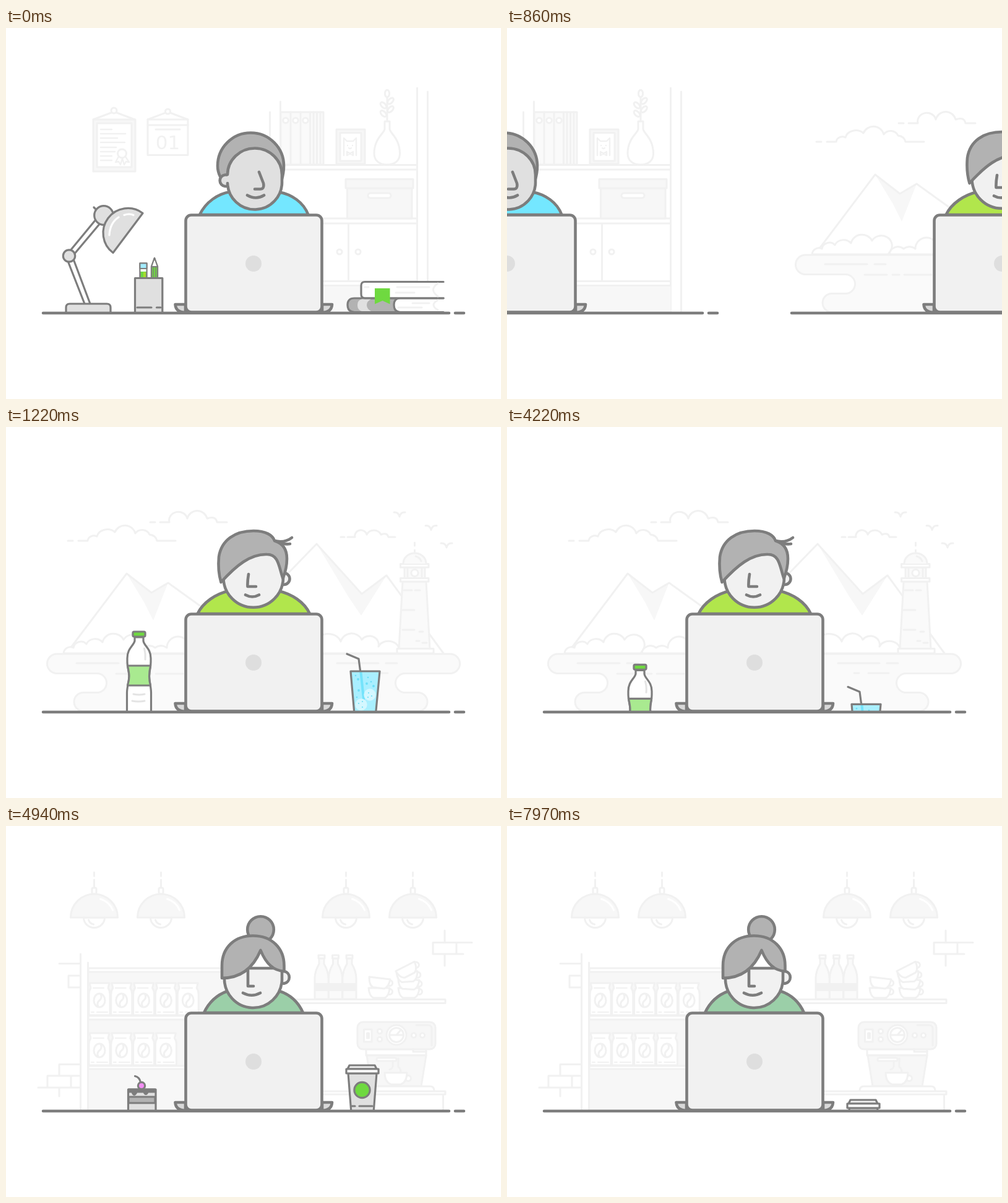
Write an HTML page that moves like this. It is 800 px wide and 600 px high and loops after 8 s.

```html
<!DOCTYPE html>
<html lang="en">
<head>
<meta charset="utf-8">
<title>Three desks</title>
<style>
html, body { margin: 0; width: 100%; height: 100%; overflow: hidden; background: #fff; }
svg { display: block; width: 100vw; height: 100vh; }
g { stroke-linecap: round; stroke-linejoin: round; }
.back { stroke: #f1f1f1; stroke-width: 3; }
.bold { stroke: #7d7d7d; stroke-width: 4.6; }
.prop { stroke: #7d7d7d; stroke-width: 3.2; }
.day { font: 31px "DejaVu Sans", sans-serif; fill: #f1f1f1; stroke: none; text-anchor: middle; }
</style>
</head>
<body>
<svg id="stage" viewBox="0 0 800 600">
  <clipPath id="above"><rect width="800" height="460"/></clipPath>
</svg>
<script>
const GREY = '#e0e0e0', DARK = '#7d7d7d', HAIR = '#b2b2b2', SKIN = '#f1f1f1';
const TINT = '#f7f7f7', PALE = '#fafafa', GREEN = '#6fd940', WHITE = '#fff';

const path = (d, fill = 'none', more = '') => `<path d="${d}" fill="${fill}" ${more}/>`;
const box = (x, y, x2, y2, fill = 'none', r = 0, more = '') =>
  `<rect x="${x}" y="${y}" width="${x2 - x}" height="${y2 - y}" rx="${r}" fill="${fill}" ${more}/>`;
const disc = (x, y, r, fill = 'none', more = '') =>
  `<circle cx="${x}" cy="${y}" r="${r}" fill="${fill}" ${more}/>`;
const oval = (x, y, rx, ry, turn = 0) =>
  `<ellipse rx="${rx}" ry="${ry}" fill="#fff" transform="translate(${x} ${y}) rotate(${turn})"/>`;
const line = (color, width) => `stroke="${color}" stroke-width="${width}"`;
const bare = 'stroke="none"';
const each = (list, draw) => list.map(draw).join('');

const laptop =
  path('M290 447H273.5Q274.500 460 290 460ZM511 447H527Q526 460 511 460Z', '#d9d9d9') +
  box(290.5, 302.5, 510.5, 459.5, SKIN, 9) +
  disc(400, 381, 13, '#dedede', bare) +
  path('M60 461H716M726 461H740');

// Office
function office() {
  const wall =
    path('M141 148L170 137M179 137L208 148M229 148L258 137M265 137L294 148') +
    disc(174.5, 133.5, 4.5) + disc(261.5, 135, 4) +
    box(141, 148, 209, 232, TINT) + box(147, 154, 203, 225, WHITE) +
    path('M153 164H171M153 171H193M153 178H180M153 185H192M153 193H178M153 200H176M153 207H171M153 214H171', 'none', line('#f1f1f1', 2.4)) +
    path('M182 208L177 217L182 216L185 221L188 211L191 221L194 216L199 217L193 208', WHITE, line('#f1f1f1', 2.4)) +
    disc(187.500, 203, 7, WHITE) +
    box(229, 148, 294, 205.5, WHITE) + path('M242 164H281M229 157H294') +
    '<text class="day" x="261.5" y="196">01</text>';

  const shelf =
    path('M443.5 119V221M426.5 136V221M664.5 97V459M681.5 103V459') +
    box(500, 417, 664.5, 459, TINT, 0, bare) +
    path('M430 221.5H664M430 229H664M500 308H664M500 316H664M500 409.5H664M500 416.5H664M553.5 316V409') +
    disc(539, 362, 4) + disc(569, 362, 4) +
    box(551.5, 259, 656, 308, TINT) + box(549, 244.5, 658, 259, TINT) +
    box(585, 267, 622, 275, WHITE, 4) +
    box(444, 136, 513, 221, PALE) +
    path('M460 136V221M476 136V221M491.5 136V221M497 136V221M502.5 136V221M508 136V221') +
    each([452, 468, 484], x => disc(x, 149.5, 4.3, WHITE)) +
    box(534, 164, 580, 220, TINT) + box(540, 169.5, 574, 215, WHITE) +
    path('M546 206V178L551 183H561L566 178V206M551 200L561 206V200L551 206ZM552 190V190.1M560 190V190.1M554 194Q556 196 558 194', 'none', line('#f1f1f1', 2.4)) +
    path('M612 151V163C612 170 595 178 595 203C595 214 603 221 616 221S636.5 214 636.5 203C636.5 178 620 170 620 163V151Z', WHITE) +
    path('M616 150V112') + oval(616, 106, 3.6, 5.8) +
    oval(610, 125, 3.4, 6, -45) + oval(610, 138.5, 3.4, 6, -45) +
    oval(621.5, 118, 3.4, 6, 45) + oval(621.5, 131.5, 3.4, 6, 45);

  const person =
    path('M313 302C323 281 343 268 362 265H440C462 269 481 282 488.5 302Z', '#74e7ff') +
    path('M346 240Q342 232 342 223A53.500 53.500 0 0 1 449 223Q449 234 445.500 246Z', HAIR) +
    path('M359 237.5H354A9.3 9.3 0 0 0 354 256H358', GREY) +
    path('M358 237A44 43 0 0 1 446 238V248A44 44 0 0 1 358 251', GREY) +
    path('M409 233L416 251Q418 261 410 260.500H402M390 270.5Q404 278.500 417 270.5');

  const lamp =
    path('M100 377L127 446M109 374L136 446M103 361L145 310M110 366L152 316') +
    path('M97 462V452Q97 446 103 446H163Q169 446 169 452V462Z', GREY) +
    disc(102, 368.5, 9.7, GREY) +
    path('M142 290L147 295') + disc(158, 303, 15.3, GREY) +
    path('M173 363.5A40 40 0 0 1 221 299.5Z', GREY) +
    path('M167 335Q168 315 182 306M191 302.5Q199 299.500 206 302.5', 'none', line(WHITE, 3.2));

  const pencils =
    box(216.500, 380.500, 227.500, 405, GREEN, 0, line(DARK, 2.4)) +
    path('M222 395H226V404H222Z', '#a8dc2c', bare) +
    path('M216.500 380.500H227.500V389H216.500Z', '#a3ecff', line(DARK, 2)) +
    path('M217.500 390H226.500V394H217.500Z', WHITE, bare) +
    path('M235 405V386L240 372L245 386V405Z', GREEN, line(DARK, 2.4)) +
    path('M235 386L240 372L245 386Z', WHITE, line(DARK, 2)) +
    path('M238.200 387V404M241.800 387V404', 'none', line(DARK, 1.2)) +
    path('M239 375L240 372L241 375Z', DARK, line(DARK, 2)) +
    box(208.500, 404.5, 252.8, 462, GREY) +
    path('M212 452H235M243.500 452H250');

  const books =
    path('M634 437H563Q552 437 552 448T563 459.500H634Z', HAIR) +
    path('M575 438.500Q568 440 568 448T575 458H590Q583 454 583 448T590 438.500Z', GREY, bare) +
    path('M707 437H637Q627 437 627 448T637 459.500H707', WHITE) +
    path('M707 410.500H580Q574 410.500 574 416.500V430.500Q574 436.8 580 436.8H707', WHITE) +
    path('M698 413Q683 423 698 434M698 440Q684 448 698 456M632 419H684M580 419H586M630 428H660M657 445H684M634 452H672', 'none', line('#f1f1f1', 3)) +
    path('M596 421H620.500V446.500L608.5 441L596 446.500Z', GREEN, bare);

  return [wall + shelf, person, lamp + pencils + books];
}

// Seaside
function seaside() {
  const bird = ([x, y]) => path(`M${x - 9} ${y - 4}Q${x - 2} ${y - 5} ${x} ${y + 3}Q${x + 2} ${y - 5} ${x + 9} ${y - 4}`);
  const back =
    path('M100 184H108M117 184H132A10 9 0 0 1 147 177A17 14 0 0 1 176 170A17.500 17.500 0 0 1 209 172A13 12 0 0 1 232 174Q242 175 244 184H274') +
    path('M233 154H241M249 154H264A13 12 0 0 1 293 148A16.500 16.500 0 0 1 325 148Q339 143 341 154H357') +
    path('M541 178H547M552 178H564A9.500 9 0 0 1 583 174A13 13 0 0 1 606 174Q616 170 618 178H629') +
    each([[636, 142], [687, 163.500], [712, 192]], bird) +
    path('M195 237L235 268L262 252L238 313L223 283Z', TINT, bare) +
    path('M502 189L575 270L615 240L574 305L553 274Z', TINT, bare) +
    path('M100 363L195 237L235 268L262 252L330 301M440 253L502 189L575 270L615 240L707 366') +
    path('M82.5 367H717.5a16 15.7 0 0 1 0 31.500H645a15.5 15.5 0 0 0 0 31H666a15 15 0 0 1 0 30H125a15 15 0 0 1 0-30H147a15.5 15.5 0 0 0 0-31H82.5a16 15.7 0 0 1 0-31.500Z', PALE) +
    path('M93 366A11 11 0 0 1 109 357A12 11 0 0 1 130 351A15 13 0 0 1 156 348A18 17 0 0 1 190 344A16 15 0 0 1 220 360L216 366Z', WHITE) +
    path('M218 366A14 13 0 0 1 241 357A14 12 0 0 1 260 357A17 17 0 0 1 296 357V366Z', WHITE) +
    path('M500 366V360A16 14 0 0 1 541 347A18 17 0 0 1 575 344A15 14 0 0 1 602 355A17 14 0 0 1 634 366Z', WHITE) +
    path('M114 382H182M194 382H212M178 399H214M223 399H234M242 399H286M535 382H602M614 382H632M561 398H569M584 398H617');
  const tower =
    path('M641 250L635 359H685L679 250Z', PALE) +
    box(632, 358.5, 691, 366, WHITE) +
    box(644, 227, 677, 245, PALE) + path('M649 227V245M672 227V245') +
    disc(660.5, 236, 5.6, WHITE) +
    box(637.5, 244.5, 683, 250, WHITE) + box(637.5, 221.5, 683, 227, WHITE) +
    path('M642 221A18.5 17 0 0 1 679 221', PALE) +
    path('M660.500 204V199M660.500 192V187M662 209Q669 211 671 217M643 264H656M661 264H669M641 296H660M641 328H660M663 346H668M673 349H680M668 331H674');

  const person =
    path('M309.500 302C319 283 339 270 360 265H440C462 270 482 283 491 302Z', '#b1e64c') +
    path('M446 236H449A9.4 9.4 0 0 1 449 255H445', SKIN) +
    disc(399.7, 243.500, 48.3, SKIN) +
    path('M434 184Q450 188 462 179M447 188Q452 190 459 189') +
    path('M347.5 251C343 236 343 221 344 210C348 183 370 168 400 168C420 168 431 175 434 184C447 188 454 198 454 213C454 225 451 236 447.5 245C441 227 441 206 422 206C395 205 372 224 347.5 251Z', HAIR) +
    path('M392 238Q390 250 390.500 258H404M387 271.5Q398 277.5 409 271.5');

  const bottle =
    path('M208 340V346C206 354 196 358 196 374V380C196 390 199 395 199 403S195.5 420 195.5 430V464H234.5V430C234.5 420 231.500 412 231.500 403S234 390 234 380V374C234 358 223 354 222 346V340Z', WHITE) +
    path('M196.5 386H233.5C232 393 231.500 398 231.500 403S232 413 233.5 418H196.5C198 413 199 408 199 403S198 393 196.5 386Z', '#a9ea90') +
    box(205, 331, 225, 339, GREEN, 2) +
    path('M223.500 358Q226 367 225 376M206 432Q215 434 224 432M204 443Q214 445 224 443', 'none', line('#e4e4e4', 3));
  const bubbles = [[569, 408], [585, 405], [570, 426], [590, 412], [594, 419], [567, 437], [583, 415], [565, 402]];
  const glass =
    path('M551 367L570 375L572.5 394') +
    path('M557 395H604L597.5 464H563Z', '#a9efff', bare) +
    path('M573.500 397L578 440', 'none', line('#74e3fb', 4)) +
    disc(574, 449, 9.7, '#d4f7ff', bare) + disc(588, 433, 9.7, '#d4f7ff', bare) +
    each(bubbles, ([x, y], i) => disc(x, y, i % 2 ? 1.3 : 1.9, '#6ddff7', bare)) +
    each([[570, 447], [576, 453], [586, 430], [591, 435], [576, 444], [585, 437]], ([x, y]) => disc(x, y, 1.100, '#6ddff7', bare)) +
    path('M557 395H604L597.5 464H563Z');

  return [back + tower, person, bottle + glass];
}

// Coffee shop
function cafe() {
  const pendant = x =>
    path(`M${x} 75V81M${x} 87V100`) + box(x - 3.5, 100, x + 3.5, 110, WHITE, 2) +
    path(`M${x - 17} 148A17 16.5 0 0 0 ${x + 17} 148Z`, WHITE) +
    path(`M${x - 38} 148A38 38 0 0 1 ${x + 38} 148Z`, TINT) +
    path(`M${x - 9} 152Q${x - 7} 158 ${x - 1} 159`) +
    path(`M${x + 10} 118Q${x + 24} 122 ${x + 30} 136`, 'none', line(WHITE, 3));
  const bag = (x, y) =>
    path(`M${x - 16} ${y}L${x - 14} ${y + 8}Q${x - 17} ${y + 12} ${x - 17} ${y + 18}V${y + 52}H${x + 17}V${y + 18}Q${x + 17} ${y + 12} ${x + 14} ${y + 8}L${x + 16} ${y}Z`, WHITE) +
    path(`M${x - 10} ${y + 8}H${x + 7}M${x - 13} ${y + 47}H${x - 9}M${x - 4} ${y + 47}H${x + 13}`, 'none', line('#f1f1f1', 2)) +
    oval(x, y + 28, 9, 11) + path(`M${x + 2} ${y + 18}Q${x + 5} ${y + 24} ${x} ${y + 28}T${x - 2} ${y + 38}`);
  const bottle = x =>
    path(`M${x - 4} 214V223Q${x - 11} 235 ${x - 11} 246V280H${x + 11}V246Q${x + 11} 235 ${x + 4} 223V214Z`, PALE) +
    box(x - 5, 209, x + 5, 214, WHITE) + box(x - 10, 254, x + 10, 267, '#f1f1f1', 0, bare);
  const cup = (x, y, turn = 0) => `<g transform="translate(${x} ${y}) rotate(${turn})">` +
    disc(17, 6, 4.5) + path('M-17 0H17Q16 13 9 16H-9Q-16 13 -17 0Z', WHITE) + '</g>';
  const row = (n, y) => each([...Array(n).keys()], i => bag(151 + 35.8 * i, y));

  const left =
    box(133, 230, 390, 459, TINT, 0, bare) +
    each([[230, 236], [307, 313], [388, 393]], ([a, b]) => box(133, a, 390, b, WHITE)) +
    row(5, 254) + row(4, 335) +
    path('M120.5 207V459M132.5 221V459M86 222.5H120M120 242H101V261H120M120 385.5H86V404M67 404H120M67 404V423M52 423H120M105 404V423M86 423V437');
  const right =
    box(450, 280.5, 710, 286.5, WHITE) + each([510, 532.5, 555], bottle) +
    cup(603, 262) + cup(604, 246, 7) +
    cup(651, 262) + cup(651, 248, 4) + cup(648, 236, -4) + cup(645, 227, -27) +
    path('M690 188.500H753M690 188.500V207H739M728 188.500V207M709 169V188M709 207V226');
  const machine =
    path('M582 361H679V371H582Z', WHITE) + path('M583 371H679L671 421H591Z', TINT) +
    box(568, 317, 694, 361, TINT, 9) + box(578.5, 329, 591, 349, WHITE) + box(583.500, 335, 586.500, 343) +
    each([[604, 332], [604, 345], [659, 338.500], [673, 338.500]], ([x, y]) => disc(x, y, 3.7, WHITE)) +
    disc(631, 338, 16, WHITE) + disc(631, 338, 11.500) + path('M621 338H641M631 338L637 331') +
    path('M663 322H682Q688 322 688 328V355M658 361V365H679') +
    box(599, 375, 631, 380, WHITE, 2) + path('M625 380V388Q625 392 620 394M634 376V390Q638 392 638 398') +
    disc(650, 408, 4.500, WHITE) + path('M612 399H648Q648 414 638 418H622Q612 414 612 399Z', WHITE) +
    path('M570 428Q570 421 577 421H685Q692 421 692 428', WHITE) +
    path('M706.500 434V459') + box(500, 429, 710, 434, WHITE);

  const person =
    path('M320 302C328 285 341 273 358 267H442C460 273 473 286 480 302Z', '#9bcfa8') +
    disc(411.5, 167.5, 21.3, HAIR) +
    path('M446 235H450A10 10 0 0 1 450 254.5Q448 255 446 254', SKIN) +
    path('M353 240V245A46.500 47 0 0 0 446 249V230H353Z', SKIN) +
    path('M349 246V226C349 196 370 177.500 399 177.500C430 177.500 449.5 198 449.5 226V235C430 234 419 220 411.5 201C401 226 382 246 349 246Z', HAIR) +
    path('M391 232V259H400M383 270Q397 277.500 411 270');

  const cake =
    box(197.500, 426, 242, 464, GREY) + path('M198 438H241V448H198Z', HAIR) +
    path('M198 426H241V430H229Q226 437 223 430H211Q207 439 204 430H198Z', DARK) +
    path('M208.500 404.5Q216 406 217.500 415') + disc(219, 420, 5.6, '#f28df3');
  const takeaway =
    path('M553 400L558 464H594L599 400Z', GREY) +
    path('M555 387H596L599 393H552Z', SKIN) + box(550, 393, 602, 400, WHITE) +
    disc(575.5, 427, 12.6, GREEN) + path('M559 453H564M571 453H592');

  return [each([142.5, 250.5, 549.5, 657.5], pendant) + left + right + machine, person, cake + takeaway];
}

const stage = document.getElementById('stage');
const scenes = [office(), seaside(), cafe()].map(([back, person, props]) => {
  stage.insertAdjacentHTML('beforeend', `<g><g class="back">${back}</g><g class="bold">${person}</g>
    <g clip-path="url(#above)"><g class="prop">${props}</g></g><g class="bold">${laptop}</g></g>`);
  const root = stage.lastElementChild;
  return { root, props: root.querySelector('.prop') };
});

// Each switch: props sink in three steps, the view pans, new props rise.
const LOOP = 8000, SINK = 3, DEPTH = [180, 160, 84];
const TICKS = [0, 30, 60, 160, 260, 360, 460, 560, 660, 690, 720];
const unit = v => Math.min(1, Math.max(0, v));

function change(time, pan) {
  const step = TICKS.filter(tick => time >= tick).length;
  return {
    sink: unit(step / SINK),
    pan: unit((step - SINK) / pan),
    rise: unit((step - SINK - pan) / (TICKS.length - SINK - pan))
  };
}

function draw(t) {
  const a = change(t - 500, 6), b = change(t - 4220, 5), c = change(t - 7940, 5);
  const view = 800 * (a.pan + b.pan);
  const sunk = [a.sink, 1 - a.rise + b.sink, 1 - b.rise + c.sink];
  scenes.forEach(({ root, props }, i) => {
    root.setAttribute('transform', `translate(${800 * i - view} 0)`);
    props.setAttribute('transform', `translate(0 ${DEPTH[i] * sunk[i]})`);
  });
}

const start = performance.now();
function tick() {
  draw((performance.now() - start) % LOOP);
  requestAnimationFrame(tick);
}
tick();
</script>
</body>
</html>
```
